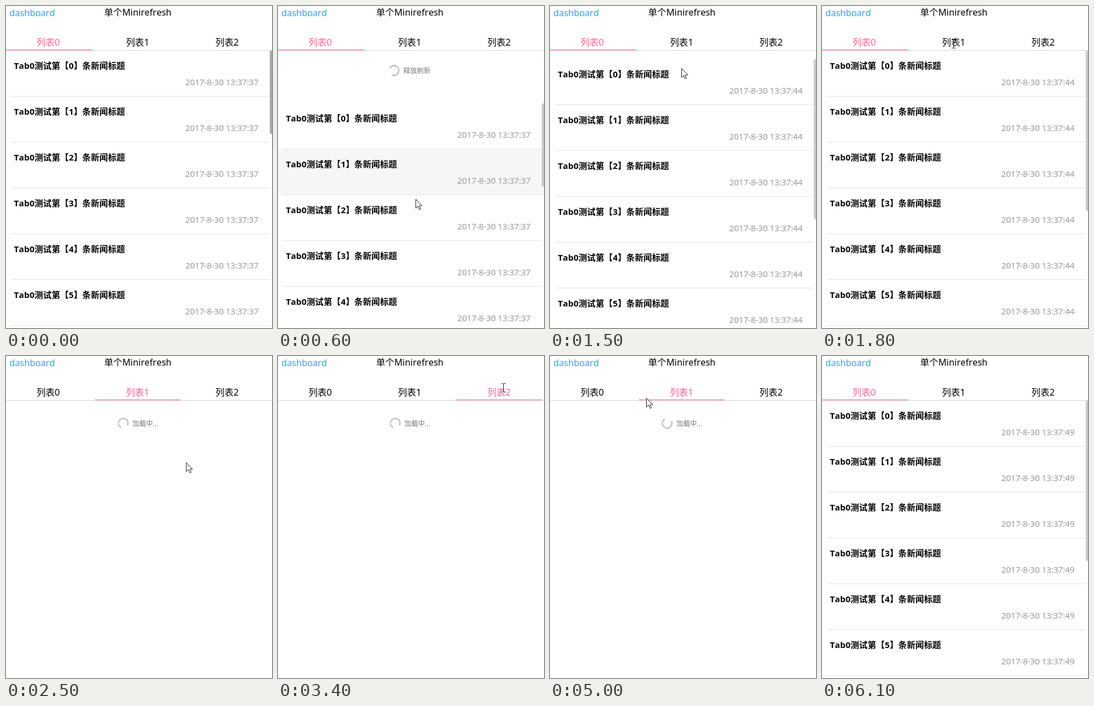
Write an HTML page that moves like this. It is 470 px wide and 569 px high and loops after 6600 ms.

```html
<!DOCTYPE html>
<html lang="zh-CN">
<head>
<meta charset="utf-8">
<title>Minirefresh</title>
<style>
html, body { margin: 0; width: 100%; height: 100%; overflow: hidden; background: #fff; }
svg { display: block; width: 470px; height: 569px; }
text { font: 16px 'Noto Sans', 'Noto Sans CJK SC', 'Noto Sans CJK', sans-serif; font-kerning: none; white-space: pre; }
.back { fill: #2ea5f7; letter-spacing: -.1px; }
.title { font-size: 15px; font-weight: 700; letter-spacing: .14px; }
.date { font-size: 15px; fill: #999; text-anchor: end; letter-spacing: -.22px; }
.status { font-size: 12px; fill: #777; }
</style>
</head>
<body>
<svg viewBox="0 0 470 569">
  <defs><clipPath id="view"><rect y="79" width="470" height="490"/></clipPath></defs>
  <text class="back" x="6" y="18">dashboard</text>
  <text x="173.5" y="17">单个Minirefresh</text>
  <g id="tabs"></g>
  <rect y="78" width="470" height="1" fill="#d6d6d6"/>
  <rect id="underline" y="77" width="152" height="1" fill="#ff6095"/>
  <g clip-path="url(#view)">
    <g id="loader">
      <circle id="ring" r="8.6" fill="none" pathLength="360" stroke-dasharray="270 90"/>
      <text id="status" class="status" x="16.5" y="4.5"></text>
    </g>
    <g id="list">
      <rect id="press" y="160" width="470" height="80" fill="#f6f6f6"/>
      <g id="rows"></g>
      <rect id="thumb" x="466" y="79" width="8" rx="3"/>
    </g>
  </g>
  <g id="cursor" stroke="#1c1c28">
    <path id="arrow" fill="#fff" d="M.5 .5V16.2L4.2 12.8 6.8 18.6 9.2 17.6 6.7 11.9H11.6Z"/>
    <path id="beam" fill="none" d="M-3 -7.5H-1L.5 -6.5 2 -7.5H4M.5 -6.5V6.5M-3 7.5H-1L.5 6.5 2 7.5H4"/>
  </g>
</svg>
<script>
const LOOP = 6600, STEP = 100, HOLD = 75, DONE = 1345, BOUNCE = 310;
const $ = id => document.getElementById(id);

function add(parent, tag, attrs, label = '') {
  const el = document.createElementNS('http://www.w3.org/2000/svg', tag);
  for (const key in attrs) el.setAttribute(key, attrs[key]);
  el.textContent = label;
  return parent.appendChild(el);
}
const set = (el, key, value) => el.setAttribute(key, value);
const show = (el, on) => set(el, 'display', on ? 'inline' : 'none');

const tabs = [0, 1, 2].map(i => add($('tabs'), 'text', { x: 54 + i * 158, y: 70 }, '列表' + i));
const rows = Array.from({ length: 7 }, (_, i) => {
  const y = i * 81;
  add($('rows'), 'rect', { x: 9, y: 159 + y, width: 457, height: 1, fill: '#e2e2e2' });
  return {
    title: add($('rows'), 'text', { class: 'title', x: 14, y: 111 + y }),
    date: add($('rows'), 'text', { class: 'date', x: 446, y: 140 + y })
  };
});

// tab switches: start, end of loading, tab, seconds on the new rows
const visits = [
  [2000, 2600, 1, 45], [3400, 4000, 2, 47], [4700, 5300, 1, 48], [5600, 6100, 0, 49]
];

// pointer path: time, x, y
const path = [
  [100, 240, 206], [600, 243, 341], [700, 243, 351], [800, 243, 351], [1400, 233, 125],
  [1500, 232, 110], [1800, 232, 67], [2100, 234, 67], [2500, 318, 188], [2600, 337, 187],
  [3000, 398, 54], [3100, 398, 54], [3200, 398, 56], [3500, 398, 56], [4000, 299, 303],
  [4500, 232, 71], [4800, 232, 71], [5000, 170, 74], [5300, 76, 66], [5700, 76, 66],
  [6000, 20, 140]
];

function pointer(t) {
  const i = path.findIndex(p => p[0] >= t);
  if (i < 0 || t < path[0][0]) return null;
  const b = path[i], a = path[Math.max(0, i - 1)];
  const k = b[0] > a[0] ? (t - a[0]) / (b[0] - a[0]) : 1;
  return [a[1] + (b[1] - a[1]) * k, a[2] + (b[2] - a[2]) * k];
}

// the CSS "ease" curve
function ease(x) {
  if (x <= 0) return 0;
  if (x >= 1) return 1;
  let lo = 0, hi = 1, s = .5;
  for (let i = 0; i < 20; i++) {
    s = (lo + hi) / 2;
    const at = .75 * s * (1 - s) ** 2 + .75 * s * s * (1 - s) + s ** 3;
    if (at < x) lo = s; else hi = s;
  }
  return .3 * s * (1 - s) ** 2 + 3 * s * s * (1 - s) + s ** 3;
}

function pull(t) {
  if (t < 100) return 0;
  if (t < 800) {
    const drag = pointer(t)[1] - path[0][2];
    return drag < HOLD ? drag : HOLD + (drag - HOLD) * .3;
  }
  if (t < DONE) return 96 + (HOLD - 96) * ease((t - 750) / BOUNCE);
  return HOLD * (1 - ease((t - DONE) / BOUNCE));
}

function drawLoader(loading, offset, angle, label) {
  const x = loading ? 207 : 205;
  const y = (loading ? 119 : 114) + Math.min(0, offset - HOLD);
  show($('loader'), offset > 0);
  set($('loader'), 'transform', `translate(${x} ${y})`);
  set($('ring'), 'transform', `rotate(${115 + angle})`);
  set($('ring'), 'stroke', loading ? '#aaa' : '#777');
  set($('ring'), 'stroke-width', loading ? 1.6 : 1);
  $('status').textContent = label;
}

function drawCursor(t) {
  const at = pointer(t);
  show($('cursor'), at);
  if (!at) return;
  const [x, y] = at.map(Math.round);
  const onLabel = Math.abs(y - 63) < 11 && [75, 233, 391].some(c => Math.abs(x - c) < 22);
  set($('cursor'), 'transform', `translate(${x} ${y})`);
  show($('arrow'), !onLabel);
  show($('beam'), onLabel);
}

function draw(t) {
  const visit = visits.filter(v => t >= v[0]).pop();
  const [start, end, tab, switched] = visit || [800, 0, 0, 0];
  const empty = t < end;
  const refreshed = t >= DONE;
  const seconds = switched || (refreshed ? 44 : 37);
  const offset = visit ? (empty ? HOLD : 0) : pull(t);
  const loading = empty || t >= 800;

  tabs.forEach((el, i) => set(el, 'fill', i === tab ? '#ff6095' : '#000'));
  set($('underline'), 'x', Math.round(tab * 157.3));

  drawLoader(loading, offset,
    loading ? (t - start) * .72 : offset,
    loading ? '加载中...' : offset < HOLD ? '下拉刷新' : '释放刷新');

  set($('list'), 'transform', `translate(0 ${Math.round(offset)})`);
  show($('list'), !empty);
  show($('press'), t >= 100 && t < 800);
  set($('thumb'), 'height', refreshed ? 283 : 147);
  set($('thumb'), 'fill', t < 100 ? '#a8a8a8' : '#c9c9c9');
  rows.forEach((row, i) => {
    row.title.textContent = `Tab${tab}测试第【${i}】条新闻标题`;
    row.date.textContent = `2017-8-30 13:37:${seconds}`;
  });
  drawCursor(t);
}

const began = performance.now();
function tick() {
  const t = (performance.now() - began) % LOOP;
  draw(Math.floor(t / STEP) * STEP);
  requestAnimationFrame(tick);
}
tick();
</script>
</body>
</html>
```
